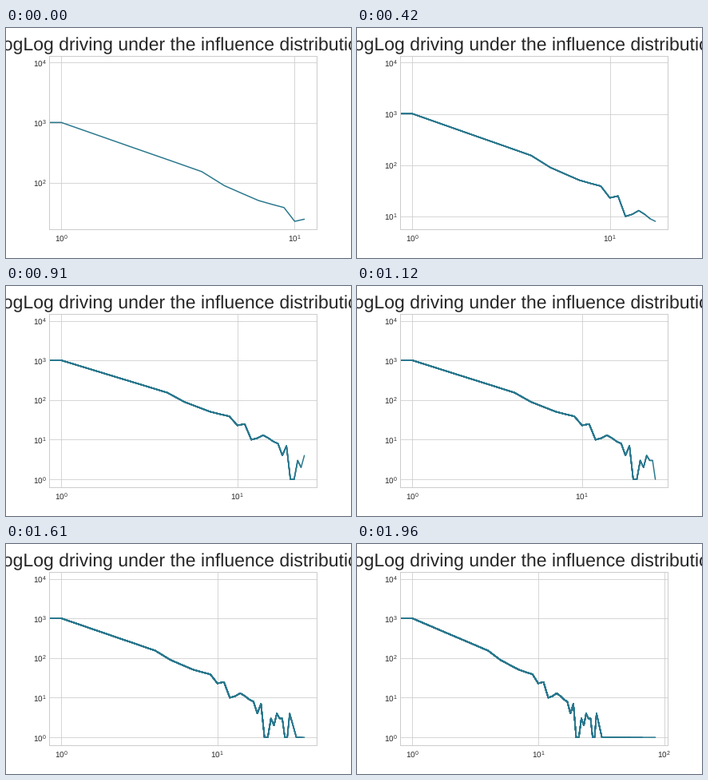
A matplotlib script that plays this animation: 432x288 px, repeating every 2.73 s.

```python
import matplotlib.pyplot as plt
import numpy as np
from matplotlib.animation import FuncAnimation

plt.style.use("seaborn-v0_8-whitegrid")
plt.rcParams.update({
    "font.family": "Liberation Sans",
    "text.hinting": "none",
    "axes.linewidth": 1,
    "grid.linewidth": 0.8,
    "xtick.major.pad": 5,
})

FRAMES, STEP_MS = 39, 70
FIRST = 12  # points in the opening curve

# Corners of the falling curve; log-log interpolation fills the rest.
CORNERS = [(1, 1010), (4, 154), (5, 90), (7, 51), (9, 39), (10, 23),
           (11, 25), (12, 10), (14, 13), (17, 8), (18, 4), (19, 7)]


def frequency(x):
    if x == 0:
        return 9630
    if x < 20:
        cx, cy = np.log10(CORNERS).T
        return round(10 ** np.interp(np.log10(x), cx, cy))
    if x >= 30 or (x - 20) % 7 < 2:
        return 1
    return 3 + round(np.sin(2.4 * (x - 23.5)))


def padded(lo, hi, margin=0.05):
    a, b = np.log10([lo, hi])
    pad = margin * (b - a)
    return 10 ** (a - pad), 10 ** (b + pad)


# Dense values first, then ever wider gaps out to 85.
sparse = np.round(36 + 49 * np.linspace(0.2, 1, 5) ** 2)
degree = np.r_[0:30, 32:37, sparse]
count = np.array([frequency(x) for x in degree])

fig = plt.figure(figsize=(6, 4), dpi=72)
ax = fig.add_axes([0.125, 0.125, 0.775, 0.755])
ax.set_title("LogLog driving under the influence distribution ", fontsize=23)
ax.set_xscale("log")
ax.set_yscale("log")

# Each step draws a longer curve over all the earlier ones.
curves = [ax.plot(degree[:n], count[:n], color="#2a788e", lw=1.5)[0]
          for n in range(FIRST, len(degree) + 1)]


def update(i):
    step = min(i, len(curves) - 1)
    n = FIRST + step
    for k, curve in enumerate(curves):
        curve.set_visible(k <= step)
    ax.set_xlim(padded(1, degree[n - 1]))
    ax.set_ylim(padded(count[:n].min(), count[:n].max()))
    return curves


anim = FuncAnimation(fig, update, frames=FRAMES, interval=STEP_MS,
                     init_func=lambda: update(0), repeat=True, repeat_delay=0)
plt.show()
```
